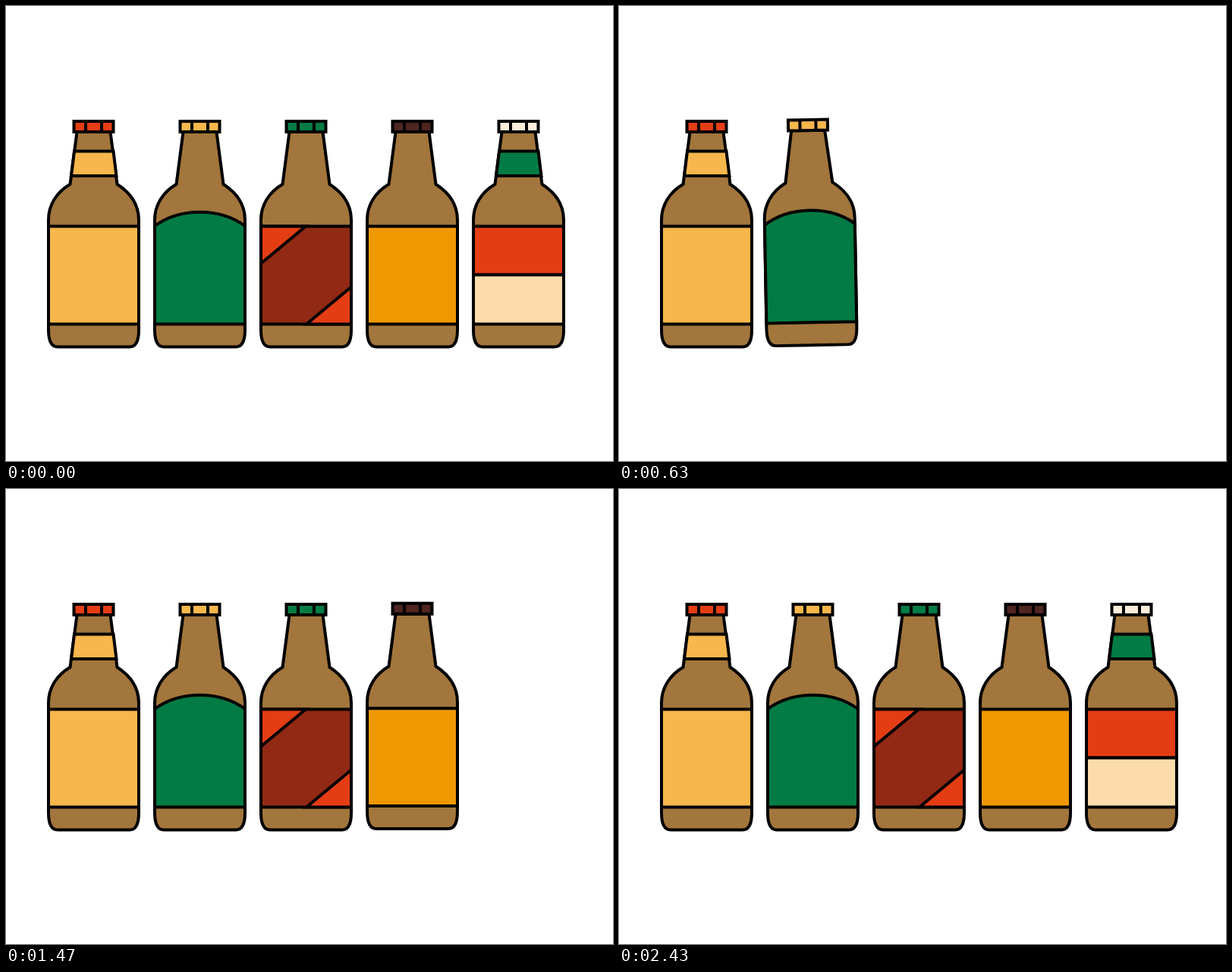
Write an HTML page that moves like this. It is 800x600 px and loops after 2790 ms.

```html
<!DOCTYPE html>
<html lang="en">
<head>
<meta charset="utf-8">
<title>Bottles</title>
<style>
  html, body { margin: 0; width: 100%; height: 100%; overflow: hidden; background: #fff; }
  svg { display: block; width: 100vw; height: 100vh; }
</style>
</head>
<body>
<svg id="stage" viewBox="0 0 800 600" stroke="#000" stroke-width="4"></svg>
<script>
const STEP = 30, LOOP = 2790;
const FIRST = 2, STAGGER = 14;                  // in steps
const SWING_START = 3.85, SWING = 9, REBOUND = 0.56, HOP = 2;
const SPACING = 140, BASE_X = 115.5, BASE_Y = 449.5, FOOT = 44, HEEL = -14;
const RED = '#e43d14', YELLOW = '#f7b74c', GREEN = '#027b44';

const shape = (d, fill) => `<path d="${d}" fill="${fill}"/>`;
const label = (fill, top = 290.5, bottom = 419.5) => shape(`M56 ${top}H175V${bottom}H56Z`, fill);
const collar = fill => shape('M90 191.5H141.5L145.5 224H86Z', fill);
const cap = fill => shape('M89.5 152H141.5V166H89.5ZM105 152V166M126 152V166', fill);
const glass = shape('M93.5 166L84.5 235C66 246 56 263 56 282V427C56 441 60 449.5 68 449.5H163' +
  'C171 449.5 175 441 175 427V282C175 263 165 247 146.5 235L137.5 166Z', '#a2763c');

// lean: first swing in degrees; swings: how often the bottle rocks
const bottles = [
  { lean: 2.45, swings: 1, cap: RED, art: collar(YELLOW) + label(YELLOW) },
  { lean: -2.7, swings: 1, cap: YELLOW,
    art: shape('M56 290C89 265.5 142 265.5 175 290V419.5H56Z', GREEN) },
  { lean: 1.65, swings: 1, cap: GREEN,
    art: label('#912914') + shape('M56 290.5H115L56 339.5Z', RED) +
      shape('M175 419.5H116L175 370.5Z', RED) },
  { lean: 0, swings: 1, cap: '#4f2521', art: label('#f09800') },
  { lean: 5, swings: 2, cap: '#fdeedb',
    art: collar(GREEN) + label(RED, 290.5, 354.5) + label('#fddcab', 354.5) }
];

const stage = document.getElementById('stage');
stage.innerHTML = bottles.map(b => `<g>${glass}${b.art}${cap(b.cap)}</g>`).join('');

// Springs up from the ground, then rocks from foot to foot
function poseAt(age, { lean, swings }) {
  const scale = age > 0 ? 1 - Math.exp(-1.4 * age) * Math.cos(age * Math.PI * 3 / 8) : 0;
  const u = (age - SWING_START) / SWING;
  if (u < 0 || u > swings) return { scale, tilt: 0, hop: 0 };
  return {
    scale,
    tilt: lean * Math.sin(Math.PI * u) * REBOUND ** Math.floor(u),
    hop: u < 0.5 ? HOP * Math.sin(2 * Math.PI * u) : 0
  };
}

function draw(time) {
  // The loop opens on the complete row
  const step = Math.floor((time % LOOP) / STEP) || LOOP / STEP;
  bottles.forEach((bottle, i) => {
    const { scale, tilt, hop } = poseAt(step - FIRST - i * STAGGER, bottle);
    const side = Math.sign(tilt);
    const group = stage.children[i];
    group.style.display = scale > 0 ? '' : 'none';
    group.setAttribute('transform',
      `translate(${BASE_X + i * SPACING + side * hop} ${BASE_Y - hop}) scale(${scale}) ` +
      `rotate(${tilt} ${side * FOOT} ${HEEL}) translate(${-BASE_X} ${-BASE_Y})`);
  });
}

const start = performance.now();
function tick() {
  draw(performance.now() - start);
  requestAnimationFrame(tick);
}
tick();
</script>
</body>
</html>
```
